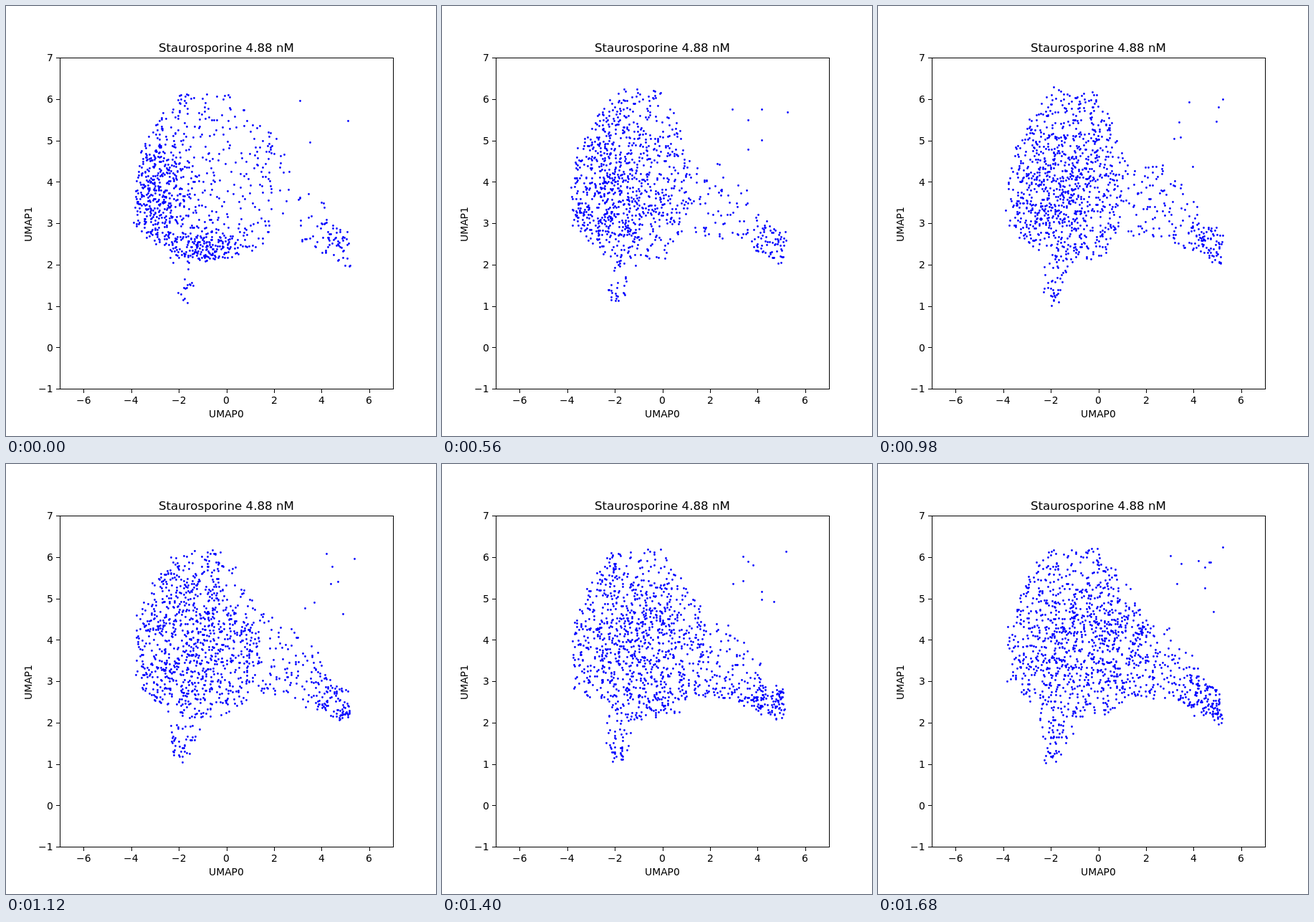
These frames come from a looping animation (600 px wide and 600 px high, 1820 ms). An HTML page with a canvas:

```html
<!DOCTYPE html>
<html>
<head>
<meta charset="utf-8">
<style>
  html, body { margin: 0; width: 100%; height: 100%; overflow: hidden; background: #fff; }
  canvas { display: block; }
</style>
</head>
<body>
<canvas id="plot" width="600" height="600"></canvas>
<script>
const ctx = document.getElementById('plot').getContext('2d');
const STEP = 140, STEPS = 13;
const BULGE = [100, 50, 30, 60, 72]; // reach of the body's right side over the loop

function randomFrom(seed) {
  return () => {
    seed = (seed + 0x6D2B79F5) | 0;
    let t = Math.imul(seed ^ (seed >>> 15), 1 | seed);
    t = (t + Math.imul(t ^ (t >>> 7), 61 | t)) ^ t;
    return ((t ^ (t >>> 14)) >>> 0) / 4294967296;
  };
}

// Linear path through evenly spaced values, p from 0 to 1
function along(values, p) {
  const at = p * (values.length - 1), i = Math.min(Math.floor(at), values.length - 2);
  return values[i] + (values[i + 1] - values[i]) * (at - i);
}

// A fresh sample of the drifting cloud for each step
function makeDots(step) {
  const p = step / (STEPS - 1);
  const early = Math.max(0, 1 - 6 * p);
  const bulge = along(BULGE, p);
  const rnd = randomFrom(step * 977 + 41);
  const between = (a, b) => a + (b - a) * rnd();
  const bell = spread => (rnd() + rnd() + rnd() - 1.5) * 2 * spread;
  const dots = [];
  const add = (x, y, blur = 2.5) => dots.push([x + bell(blur), y + bell(blur)]);
  const repeat = (n, place) => { while (n-- > 0) place(); };

  function inBody(x, y) {
    const left = 181 + 62 * (Math.abs(y - 270) / 150) ** 2.3;
    const right = 305 + bulge * Math.sin(Math.PI * (y - 118) / 260);
    const bottom = 354 - (x < 270 ? .006 : .002) * (x - 270) ** 2;
    return y > 119 && y < bottom && x > left && x < right;
  }

  function bodyDot() {
    const kind = rnd();
    let x, y;
    do {
      if (kind < .4) { // dense core, moving right
        x = 205 + 80 * p + bell(28 + 22 * p);
        y = 268 - 15 * p + bell(52);
      } else if (kind < .4 + .17 * early) { // dense lower rim
        x = 280 + bell(25);
        y = 338 + bell(15);
      } else {
        x = between(178, 410);
        y = between(118, 356);
      }
    } while (!inBody(x, y));
    add(x, y);
  }

  function armDot() {
    const x = between(350 + 58 * early, 448);
    const low = 324 + Math.max(0, x - 405) * .6;
    const high = x < 400 ? 200 + (x - 340) * .4 : 224 + (x - 400) * 1.2;
    add(x, low - (low - high) * rnd() ** 1.4);
  }

  function tailDot() {
    const dx = 46 * rnd() ** .7;
    add(433 + dx, between(291 + dx * .55, 337 + dx * .6), 1.5);
  }

  function stalkDot() {
    const s = rnd();
    add(between(226 + 8 * s, 277 - 25 * s), 348 + 67 * s);
  }

  repeat(900 + 100 * p, bodyDot);
  repeat(20 + 155 * p, armDot);
  repeat(60 + 45 * p * p, tailDot);
  repeat(22 + 40 * p, stalkDot);
  repeat(2 + 7 * p, () => add(between(405, 475), between(118, 225)));
  add(481, 161 - 45 * p);
  return dots;
}

function line(x1, y1, x2, y2) {
  ctx.beginPath();
  ctx.moveTo(x1, y1);
  ctx.lineTo(x2, y2);
  ctx.stroke();
}

// Text starts on whole pixels; shift is the part of its width left of x
function label(text, x, y, shift = .5, size = 13.89) {
  ctx.font = size + 'px "DejaVu Sans", sans-serif';
  ctx.fillText(text, Math.round(x - ctx.measureText(text).width * shift), Math.round(y));
}

function drawAxes() {
  ctx.fillStyle = ctx.strokeStyle = '#000';
  ctx.lineWidth = 1;
  ctx.strokeRect(75.5, 72.5, 465, 462);
  const name = v => String(v).replace('-', '\u2212');
  for (let v = -6; v <= 6; v += 2) {
    const x = 307.5 + v * 465 / 14, tick = Math.round(x) + .5;
    line(tick, 535, tick, 540);
    label(name(v), x, 555);
  }
  for (let v = -1; v <= 7; v++) {
    const y = 72 + (7 - v) * 57.75, tick = Math.round(y) + .5;
    line(70, tick, 75, tick);
    label(name(v), 65.5, y + 5.3, 1);
  }
  label('Staurosporine 4.88 nM', 307.5, 64, .5, 16.67);
  label('UMAP0', 307.5, 574);
  ctx.save();
  ctx.translate(36, 305);
  ctx.rotate(-Math.PI / 2);
  label('UMAP1', 0, 0);
  ctx.restore();
}

function draw(step) {
  ctx.fillStyle = '#fff';
  ctx.fillRect(0, 0, 600, 600);
  ctx.fillStyle = '#00f';
  ctx.beginPath();
  for (const dot of clouds[step]) {
    const [x, y] = dot.map(v => Math.floor(v) + .5);
    ctx.moveTo(x + 1.4, y);
    ctx.arc(x, y, 1.4, 0, Math.PI * 2);
  }
  ctx.fill();
  drawAxes();
}

const clouds = Array.from({ length: STEPS }, (_, i) => makeDots(i));
const start = performance.now();
let shown = -1;

function tick() {
  const step = Math.floor((performance.now() - start) / STEP) % STEPS;
  if (step !== shown) draw(shown = step);
  requestAnimationFrame(tick);
}
tick();
</script>
</body>
</html>
```
